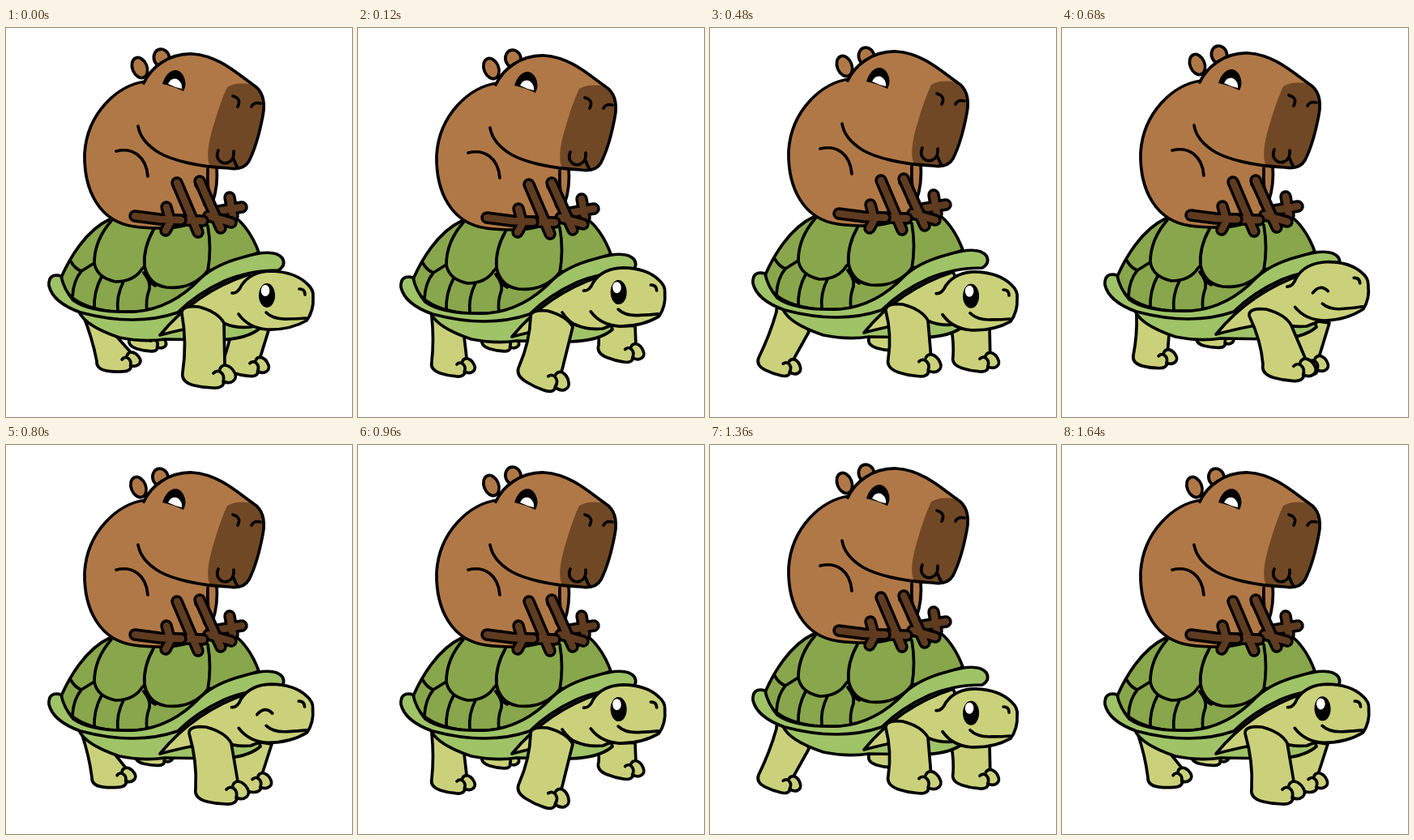
Animation of 427x480 px, one loop 1.76 s. Source, as an HTML page:

```html
<!DOCTYPE html>
<html lang="en">
<head>
<meta charset="utf-8">
<title>Capybara riding a turtle</title>
<style>
html, body { margin: 0; width: 100%; height: 100%; overflow: hidden; background: #fff; }
svg { display: block; width: 100vw; height: 100vh; }
.ink { stroke: #000; stroke-width: 3.7; stroke-linecap: round; stroke-linejoin: round; }
.line { fill: none; }
.skin { fill: #cbd17a; }
.rim { fill: #9fc367; }
.shell { fill: #88a64b; }
.fur { fill: #b07846; }
.dark { fill: #704825; }
</style>
</head>
<body>
<svg viewBox="0 0 427 480">
  <g id="back" class="ink skin"></g>
  <g class="bob ink">
    <path class="rim" d="M90 350Q98 368 140 382Q170 388 196 384L262 385Q298 384 314 370L300 325L100 330Z"/>
    <path class="skin" d="M190 379C212 352 245 322 300 304L325 360L302 369Q284 371 268 364Q235 367 190 379Z"/>
    <path class="line" d="M252 349Q260 361 270 365"/>
    <path class="shell" d="M128 236C98 250 78 285 68 308Q72 342 130 350Q195 354 225 326Q260 295 312 277C304 255 292 240 283 234Z"/>
    <path class="line" d="M130 238Q109 262 109 290Q101 295 93 300Q85 297 80 288
      M109 290Q112 308 135 313Q158 313 168 297L171 294M182 249Q169 272 171 294Q176 317 198 320Q226 323 245 304L250 298
      M249 244Q254 272 249 300M250 298Q257 301 264 295M93 300Q83 312 82 332M118 307Q108 325 109 347
      M145 313Q136 330 138 350M170 302Q179 313 177 322Q172 335 174 349M178 314L184 318"/>
    <path class="rim" d="M68 306Q52 302 53 318Q58 339 92 351Q160 369 212 351Q235 328 270 312Q300 299 336 299Q346 293 341 284Q331 271 292 283Q258 292 240 309Q205 346 160 350Q105 352 83 336Q71 322 68 306Z"/>
  </g>
  <g id="front" class="ink skin"></g>
  <g id="head" class="ink">
    <path class="skin" stroke="none" d="M283 325Q303 300 328 300Q367 304 379 326Q381 350 371 361Q350 373 322 372Q298 369 287 355Z"/>
    <path class="line" d="M279 327Q286 328 291 317Q303 300 328 300Q357 301 372 316Q380 323 379 332Q380 349 371 361Q350 373 322 372Q299 370 287 353"/>
    <path class="line" d="M321 351Q330 360 348 359Q360 359 370 358M362 322Q369 322 369 329"/>
    <g id="eyeT" stroke="none"><ellipse cx="322" cy="330" rx="10" ry="15"/><ellipse cx="320" cy="324" rx="5.3" ry="7" fill="#fff"/></g>
    <path id="lidT" class="line" d="M310 337Q320 326 329 336"/>
  </g>
  <g class="bob ink">
    <g id="ears" class="fur">
      <ellipse cx="192" cy="37" rx="9.5" ry="11" transform="rotate(-15 192 37)"/>
      <ellipse cx="165" cy="49" rx="9" ry="13" transform="rotate(-22 165 49)"/>
    </g>
    <path class="fur" d="M172 66C138 70 100 105 97 155C96 200 115 239 158 245C200 250 245 248 255 215Q262 195 260 170L230 80Z"/>
    <path class="line" d="M249 174Q248 198 253 218M234 194Q243 205 245 218"/>
    <path class="fur" stroke="none" d="M170 68C178 50 200 31 230 32C262 34 285 56 305 70C318 78 320 92 317 108C312 135 306 152 300 164Q293 176 275 173C240 172 200 163 180 145Z"/>
    <path class="dark" stroke="none" d="M273 73Q285 66 305 70C318 78 320 92 317 108C312 135 306 152 300 164Q293 176 275 173L251 169Q246 154 255 124Q264 92 273 73Z"/>
    <path class="line" d="M170 68C178 50 200 31 230 32C262 34 285 56 305 70C318 78 320 92 317 108C312 135 306 152 300 164Q293 176 275 173C235 171 205 163 189 154Q166 140 163 121"/>
    <path class="line" d="M136 152C156 147 173 158 175 183M280 84Q291 87 286 97M303 97Q306 91 314 93
      M262 151C257 163 268 169 274 166Q282 163 281 152M281 162Q284 170 286 172"/>
    <g id="eyeC" stroke="none">
      <path d="M193 69C198 52 212 46 219 59Q224 69 219 78Q207 72 193 69Z"/>
      <path fill="#fff" d="M200 69Q204 61 211 63Q218 67 217 75Q208 73 200 69Z"/>
    </g>
    <path id="lidC" class="line" d="M195 67C205 60 216 65 217 77"/>
    <g id="paws" fill="none" stroke-linecap="round" stroke-linejoin="round"></g>
  </g>
</svg>
<script>
const $ = id => document.getElementById(id);
const LOOP = 1760, STEPS = 11;
const starts = [0, 120, 200, 280, 320, 360, 440, 520, 600, 680, 800,
  880, 960, 1080, 1160, 1200, 1280, 1360, 1440, 1520, 1600, 1640];

// Vertical offsets for each step of the walk
const bob = [0, 2, 1, -1, 3, 0, -3, 3, -3, -1, 2];
const earY = [0, 1, 2, -2, 5, 1, -2, 5, -7, -4, 3];
const nod = [0, -5, -11, -12, -5, -1, 1, -6, -12, -14, -6];

// Leg rows at the key steps: hip x, hip y, heel x, heel y, foot angle
const keys = [0, 1, 4, 6, 9, 10, 11];
const legs = {
  farHind: { scale: .7, span: [30, 0], bend: 0, rows: [
    [152, 360, 152, 384, 3], [152, 360, 153, 384, 3], [175, 360, 188, 376, 0],
    [185, 360, 196, 383, 3], [165, 360, 166, 381, 0], [155, 360, 160, 382, 0]] },
  farFore: { scale: .87, span: [47, -4], bend: 2, rows: [
    [278, 374, 268, 410, 5], [295, 372, 297, 391, 8], [311, 370, 318, 397, -2],
    [298, 372, 300, 405, 4], [283, 368, 272, 409, 4], [281, 373, 271, 410, 3]] },
  nearHind: { scale: .82, span: [40, 25], bend: 3, rows: [
    [95, 354, 112, 411, -5], [91, 356, 91, 412, 4], [85, 352, 71, 405, 12],
    [82, 350, 60, 407, 12], [92, 354, 88, 404, 0], [93, 355, 106, 410, -6]] },
  nearFore: { scale: 1, span: [52, 12], bend: 6, rows: [
    [217, 352, 218, 425, 0], [213, 357, 199, 417, 18], [213, 358, 192, 412, 28],
    [217, 349, 220, 408, 4], [231, 355, 248, 415, 2], [226, 356, 234, 424, 0]] }
};

function addPath(parent) {
  const p = document.createElementNS("http://www.w3.org/2000/svg", "path");
  return $(parent).appendChild(p);
}
for (const name in legs) legs[name].path = addPath(name === "nearFore" ? "front" : "back");

// Each paw is a crossed pair of rounded sticks: dark edge, then brown core
for (const d of ["M276 209L280 232M262 226L291 221", "M239 189L265 247M250 232L278 240",
  "M211 191L237 252M217 237L243 238", "M159 232L190 236L216 237M198 221L203 239L197 250"])
  for (const [color, width] of [["#000", 15.5], ["#5f3b20", 8.5]]) {
    const p = addPath("paws");
    p.setAttribute("d", d);
    p.setAttribute("stroke", color);
    p.setAttribute("stroke-width", width);
  }

function legRow(rows, step) {
  let i = 0;
  while (step >= keys[i + 1]) i++;
  const k = (step - keys[i]) / (keys[i + 1] - keys[i]);
  const next = rows[(i + 1) % rows.length];
  return rows[i].map((v, j) => v + (next[j] - v) * k);
}

function drawLeg({ path, rows, scale, span, bend }, step) {
  const [tx, ty, hx, hy, deg] = legRow(rows, step);
  const a = deg * Math.PI / 180, c = Math.cos(a) * scale, s = Math.sin(a) * scale;
  const at = (x, y) => `${(hx + x * c - y * s).toFixed(1)} ${(hy + x * s + y * c).toFixed(1)} `;
  const rx = tx + span[0], ry = ty + span[1];
  path.setAttribute("d",
    `M${tx} ${ty}Q${(tx + hx) / 2 + bend} ${(ty + hy) / 2} ${hx} ${hy}` +
    `Q${at(-2, 12)}${at(14, 16)}Q${at(26, 19)}${at(37, 19)}C${at(46, 20)}${at(52, 16)}${at(50, 11)}` +
    `C${at(60, 16)}${at(69, 8)}${at(64, 0)}Q${at(60, -8)}${at(52, -9)}` +
    `L${rx} ${ry}Q${tx + span[0] * .86} ${ty + span[1] * .2 - 4} ${tx + span[0] * .4} ${ty - 8}` +
    `Q${tx - 1} ${ty - 10} ${tx} ${ty}` +
    `M${at(50, 11)}C${at(53, 2)}${at(44, -6)}${at(38, 1)}M${at(52, -9)}Q${at(47, -8)}${at(46, -4)}`);
}

function show(id, on) { $(id).setAttribute("visibility", on ? "visible" : "hidden"); }

function draw(ms) {
  const t = ms % LOOP;
  let n = starts.length - 1;
  while (starts[n] > t) n--;
  const step = n % STEPS;
  for (const name in legs) drawLeg(legs[name], step);
  for (const g of document.querySelectorAll(".bob")) g.setAttribute("transform", `translate(0 ${bob[step]})`);
  const e = earY[step] - bob[step];
  $("ears").setAttribute("transform", `translate(${-earY[step] * .5} ${e})`);
  const d = nod[step];
  $("head").setAttribute("transform", `translate(0 ${d * .6}) rotate(${d * .28} 285 345)`);
  const napT = n === 9 || n === 10, napC = n === 14 || n === 15;
  show("eyeT", !napT);
  show("lidT", napT);
  show("eyeC", !napC);
  show("lidC", napC);
}

const begin = performance.now();
function tick(now) {
  draw(Math.max(0, now - begin));
  requestAnimationFrame(tick);
}
draw(0);
requestAnimationFrame(tick);
</script>
</body>
</html>
```
